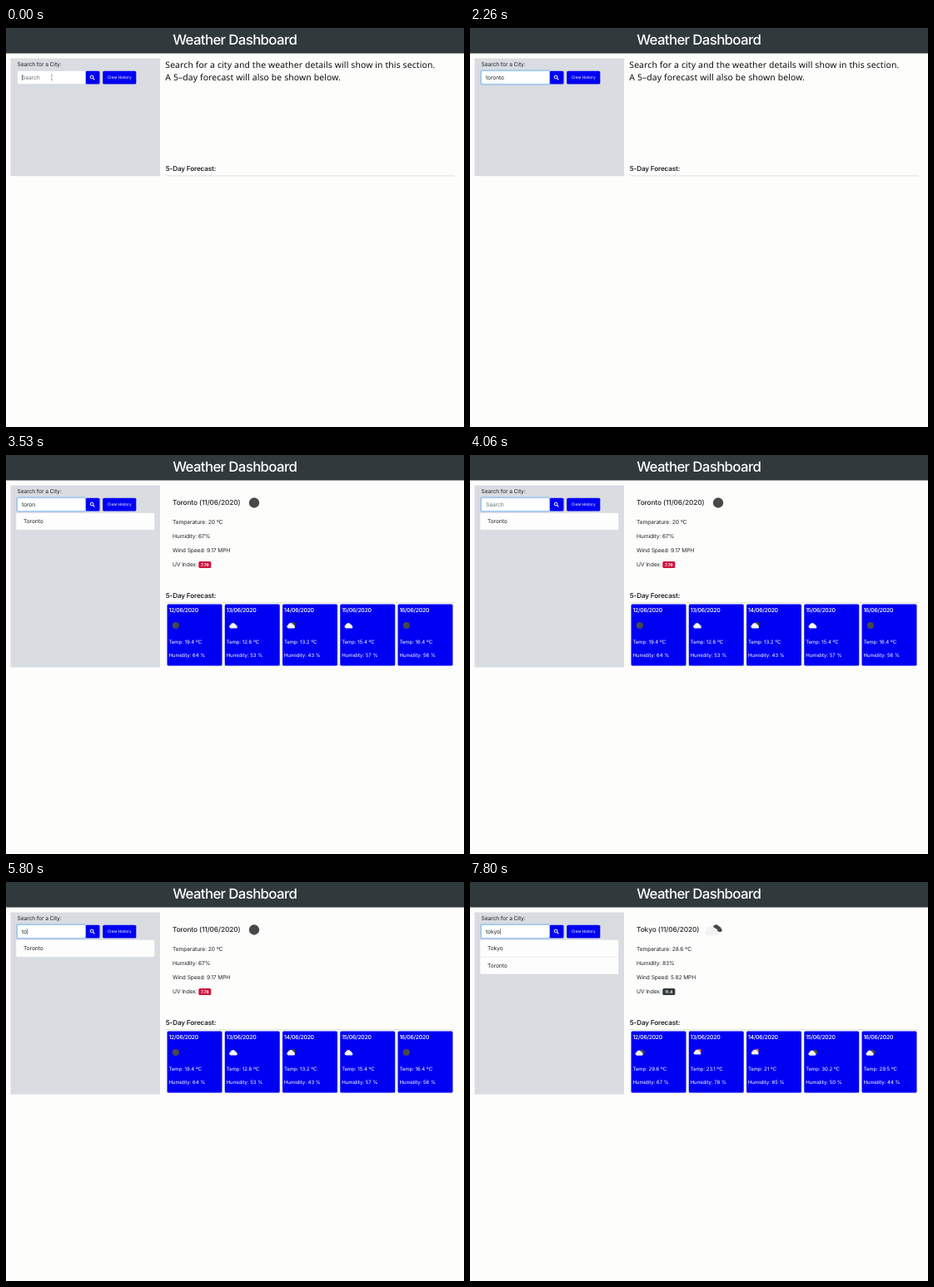
An HTML page for the animation above (8000 ms loop, 550 by 480 pixels).

```html
<!DOCTYPE html>
<html lang="en">
<head>
<meta charset="utf-8">
<title>Weather Dashboard</title>
<style>
  html, body { margin: 0; width: 100%; height: 100%; overflow: hidden; background: #fdfdfc; }
  svg { display: block; width: 550px; height: 480px; }
  text { font: 6.7px Inter, sans-serif; letter-spacing: -.015em; fill: #212529; text-rendering: geometricPrecision; }
  .title { font-size: 16.8px; font-weight: 500; letter-spacing: -.037em; fill: #fff; text-anchor: middle; }
  .intro { font: 10.4px "Noto Sans", sans-serif; letter-spacing: .012em; fill: #0c0c0c; }
  .head { font-size: 8.1px; font-weight: 600; }
  .city { font-size: 8.3px; font-weight: 500; letter-spacing: -.012em; }
  .button { font-size: 4.8px; fill: #fff; text-anchor: middle; }
  .badge { font-size: 5px; font-weight: 700; fill: #fff; text-anchor: middle; }
  .date { font-size: 6.9px; font-weight: 500; letter-spacing: -.04em; fill: #fff; }
  .card { font-size: 6.05px; letter-spacing: -.005em; fill: #fff; }
  .hint { fill: #6c757d; }
</style>
</head>
<body>
<svg id="stage" viewBox="0 0 550 480"></svg>
<script>
const LOOP = 8000, BLUE = '#0000f2', DARK = '#30393b';
const stage = document.getElementById('stage');

// [time, input text]
const typing = [
  [0, ''], [1060, 't'], [1200, 'to'], [1260, 'tor'], [1400, 'toro'], [1460, 'toron'],
  [1600, 'toront'], [1800, 'toronto'], [3460, 'toront'], [3530, 'toron'], [3730, 'toro'],
  [3800, 'tor'], [3860, 'to'], [3930, 't'], [4060, ''], [5130, 't'], [5800, 'to'],
  [6060, 'tok'], [6800, 'tokyo']
];
// [time, caret visible]
const blinking = [
  [0, 1], [460, 0], [930, 1], [2260, 0], [2800, 1], [3260, 0],
  [4800, 1], [5600, 0], [5800, 1], [6530, 0], [6800, 1], [7330, 0], [7800, 1]
];
const valueAt = (steps, t) => steps.filter(s => s[0] <= t).pop()[1];

// days: [temperature, humidity, icon]
const toronto = {
  city: 'Toronto', temp: 20, humidity: 67, wind: 9.17, uv: 7.76, badge: '#d0143c', icon: 'clear', iconX: 298,
  days: [[19.4, 64, 'clear'], [12.6, 53, 'cloud'], [13.2, 43, 'few'], [15.4, 57, 'cloud'], [16.4, 56, 'clear']]
};
const tokyo = {
  city: 'Tokyo', temp: 28.6, humidity: 83, wind: 5.82, uv: 11.4, badge: DARK, icon: 'broken', iconX: 291.5,
  days: [[29.6, 67, 'broken'], [23.1, 78, 'rain'], [21, 85, 'rain'], [30.2, 50, 'broken'], [29.5, 44, 'broken']]
};

const text = (x, y, s, cls = '') => `<text x="${x}" y="${y}" class="${cls}">${s}</text>`;
const rect = (x, y, w, h, fill, r = 0, extra = '') =>
  `<rect x="${x}" y="${y}" width="${w}" height="${h}" rx="${r}" fill="${fill}" ${extra}/>`;
const circle = (x, y, r, fill, extra = '') => `<circle cx="${x}" cy="${y}" r="${r}" fill="${fill}" ${extra}/>`;
const line = (d, stroke, width) => `<path d="${d}" fill="none" stroke="${stroke}" stroke-width="${width}"/>`;
const cloud = (fill, x = 0, y = 0, k = 1) =>
  `<path transform="translate(${x} ${y}) scale(${k})" fill="${fill}"
    d="M-3 3.5a2 2 0 0 1-.6-3.9a3.1 3.1 0 0 1 5.6-1.2a2.4 2.4 0 0 1 2 2.1a1.6 1.6 0 0 1-.7 3z"/>`;

const icons = {
  clear: () => circle(0, 0, 4.1, '#484849'),
  cloud: () => cloud('#f4f4f4'),
  few: () => circle(2.2, -1, 2.9, '#484849') + cloud('#f4f4f4'),
  broken: () => cloud('#484849', 2.6, -1.2, .75) + cloud('#f2f2f2', -.5, .4, .95),
  rain: () => circle(2.2, -2, 2.3, '#ec6e4c') + cloud('#f2f2f2', 0, -.6, .9) +
    line('M-1.5 2.4l-.7 1.2M1 2.4l-.7 1.2', '#484849', .6)
};
const icon = (name, x, y, k = 1) =>
  `<g transform="translate(${x} ${y}) scale(${k})">${icons[name]()}</g>`;

function searchBox(t, value) {
  const focus = Math.min(1, Math.max(0, (t + 10) / 210));
  let s = text(13.5, 45.8, 'Search for a City:');
  s += rect(95.6, 51.7, 16.9, 15.8, BLUE, 1.5) + rect(116.2, 51.7, 40.1, 15.8, BLUE, 1.5);
  s += circle(103.1, 59, 1.9, 'none', 'stroke="#fff"') + line('M104.5 60.4L106.4 62.3', '#fff', 1.2);
  s += text(136.2, 61.2, 'Clear History', 'button');
  s += rect(12.9, 50.9, 83.2, 17.2, 'none', 2, `stroke="#007bff" stroke-width="1.4" stroke-opacity="${.25 * focus}"`);
  s += rect(13.6, 51.6, 81.8, 15.8, '#fff', 1.4, 'stroke="#ced4da" stroke-width=".4"');
  s += rect(13.6, 51.6, 81.8, 15.8, 'none', 1.4, `stroke="#80bdff" stroke-width=".6" stroke-opacity="${focus}"`);
  s += `<g id="typed">${text(19, 61.9, value || 'Search', value ? '' : 'hint')}</g>`;
  if (t < 1060) s += line('M53.9 56.2h2M54.9 56.2v6.4M53.9 62.6h2', '#777', .6);
  return s;
}

function forecast(data, showIcons) {
  return data.days.map(([temp, humidity, name], i) => {
    const x = 193.5 + i * 69.25;
    return rect(x, 179.5, 66, 74, BLUE, 1.5) +
      text(x + 1.9, 189, `${12 + i}/06/2020`, 'date') +
      (showIcons ? icon(name, x + 10.3, 205) : '') +
      text(x + 1.9, 227.1, `Temp: ${temp} ºC`, 'card') +
      text(x + 1.9, 242.7, `Humidity: ${humidity} %`, 'card');
  }).join('');
}

function details(data, t) {
  return text(200, 59.6, `${data.city} (11/06/2020)`, 'city') +
    (t >= 2730 ? icon(data.icon, data.iconX, 57.5, data.icon === 'broken' ? 1.8 : 1.5) : '') +
    text(200, 82.9, `Temperature: ${data.temp} ºC`) +
    text(200, 99.9, `Humidity: ${data.humidity}%`) +
    text(200, 116.9, `Wind Speed: ${data.wind} MPH`) +
    text(200, 133.9, 'UV Index:') +
    rect(231.3, 128, 15, 8, data.badge, 1.5) + text(238.8, 133.8, data.uv, 'badge') +
    forecast(data, t >= 2800);
}

function history(cities) {
  return rect(12, 69.5, 166.5, 20.8 * cities.length, '#fdfdfd', 1.5, 'stroke="#d2d4d8" stroke-width=".4"') +
    cities.map((city, i) => text(21, 82.4 + i * 20.8, city) +
      (i ? line('M12 90.3H178.5', '#dcdde0', .5) : '')).join('');
}

function scene(t) {
  const data = t < 2660 ? null : t < 7800 ? toronto : tokyo;
  let s = rect(0, 0, 550, 480, '#fdfdfc') + rect(0, 0, 550, 30.5, DARK);
  s += text(274.7, 20.2, 'Weather Dashboard', 'title');
  s += rect(5.5, 36.5, 179.5, data ? 219 : 141.7, '#d9dce1');
  s += searchBox(t, valueAt(typing, t));
  s += text(191.7, 171.8, '5-Day Forecast:', 'head') + line('M191.5 177.8H538.5', '#d6d6d6', .8);
  if (!data) {
    return s + text(191.3, 47.6, 'Search for a city and the weather details will show in this section.', 'intro') +
      text(191.3, 62.9, 'A 5–day forecast will also be shown below.', 'intro');
  }
  return s + history(data === tokyo ? ['Tokyo', 'Toronto'] : ['Toronto']) + details(data, t);
}

function addCaret(t) {
  if (!valueAt(blinking, t)) return;
  const typed = document.getElementById('typed');
  const width = valueAt(typing, t) ? typed.firstChild.getComputedTextLength() : 0;
  typed.insertAdjacentHTML('beforeend', rect(19 + width, 56, .6, 7.2, '#333'));
}

let shown = '';
function draw() {
  const t = performance.now() % LOOP;
  const picture = scene(t), key = picture + valueAt(blinking, t);
  if (key !== shown) {
    stage.innerHTML = picture;
    addCaret(t);
    shown = key;
  }
  requestAnimationFrame(draw);
}
draw();
</script>
</body>
</html>
```
